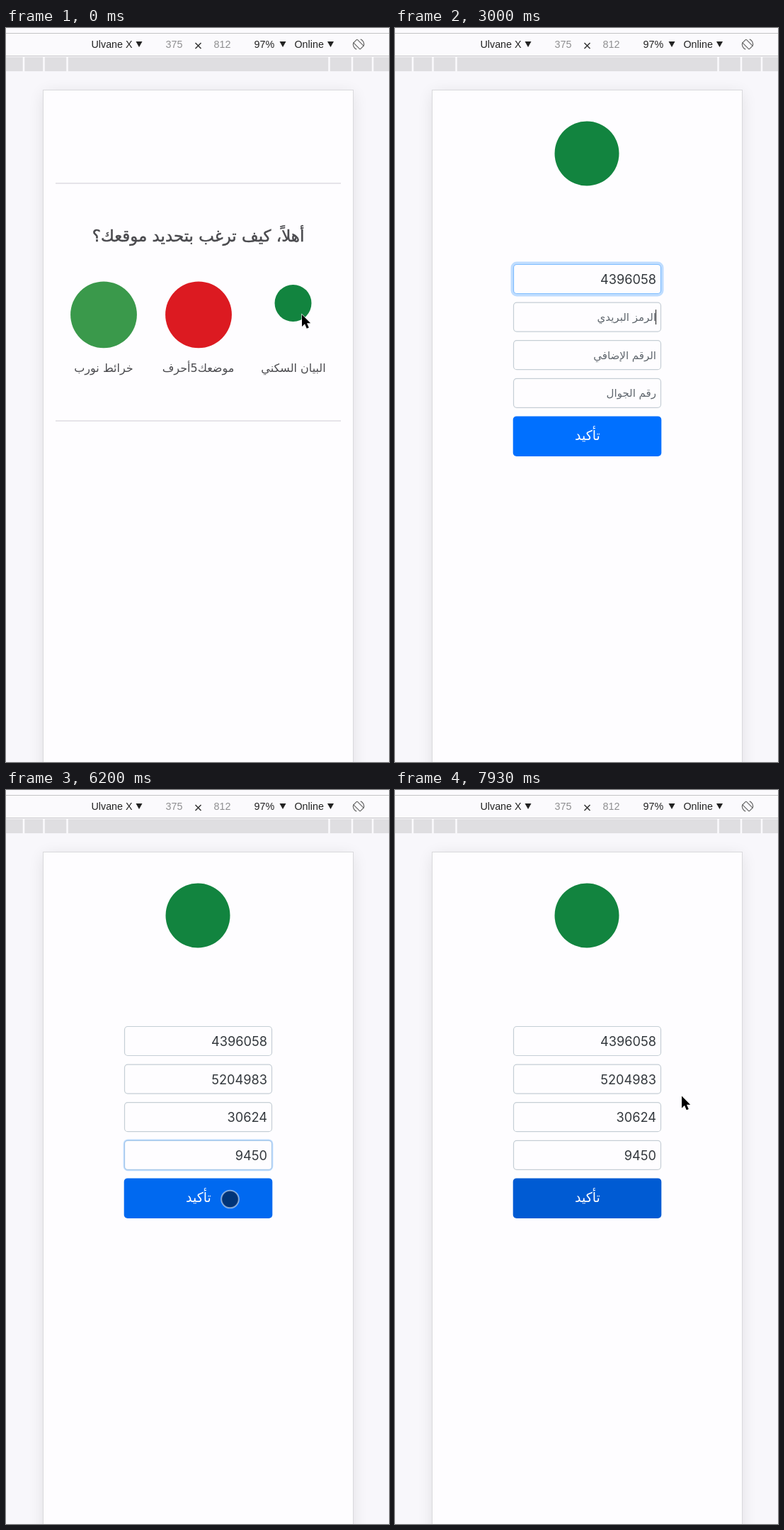
Recreate the animation shown at these times as an HTML page. Size 541 by 1035 pixels, loop 8 s.

```html
<!DOCTYPE html>
<html lang="ar">
<head>
<meta charset="utf-8">
<title>Address form</title>
<style>
html, body { margin: 0; width: 100%; height: 100%; overflow: hidden; background: #f8f7fb }
svg { display: block; width: 541px; height: 1035px; font-family: "DejaVu Sans", sans-serif }
.bar { font: 14.3px "Liberation Sans", Arial, sans-serif; fill: #222 }
.num { font: 18.2px Inter, sans-serif; fill: #33383d }
.hint { font-size: 15px; fill: #60676e }
.label { font-size: 16px; fill: #4a4a4e; text-anchor: middle }
.title { font-size: 22.9px; fill: #4a4a4e; stroke: #4a4a4e; stroke-width: .5 }
.end { text-anchor: end }
.mid { text-anchor: middle }
</style>
</head>
<body>
<svg viewBox="0 0 541 1035">
  <defs>
    <filter id="soft" x="-20%" y="-20%" width="140%" height="140%"><feGaussianBlur stdDeviation="11"/></filter>
  </defs>
  <rect width="541" height="1035" fill="#f8f7fb"/>
  <rect x="53" y="92" width="437" height="1000" fill="#000" opacity=".1" filter="url(#soft)"/>
  <rect width="541" height="41" fill="#fbfafd"/>
  <path d="M0 7.5H541M0 39.5H541" stroke="#c4c4c6"/>
  <rect y="41" width="541" height="20" fill="#dfdee1"/>
  <path d="M25 41v20M53.5 41v20M86.5 41v20M456.5 41v20M489 41v20M518 41v20" stroke="#fbfafd" stroke-width="2.5"/>
  <g class="bar">
    <text x="120.5" y="28">Ulvane X</text>
    <text x="225.5" y="28" fill="#8f8f91">375</text>
    <text x="293.5" y="28" fill="#8f8f91">812</text>
    <text x="350.5" y="28">97%</text>
    <text x="407.5" y="28">Online</text>
    <path d="M183.5 19h9l-4.5 8zM386.5 19h9l-4.5 8zM454 19h9l-4.5 8z"/>
  </g>
  <path d="M267.5 21l8 8m0-8l-8 8" stroke="#333" stroke-width="1.5"/>
  <g transform="translate(498 23) rotate(-45)" fill="none" stroke="#666" stroke-width="1.2">
    <rect x="-3.5" y="-6.5" width="7" height="13" rx="1"/>
    <path d="M-7 3A7.5 7.5 0 0 1-3-7M7-3A7.5 7.5 0 0 1 3 7"/>
  </g>
  <rect x="52.5" y="87.5" width="438" height="960" fill="#fefdff" stroke="#d9d9dc"/>

  <g id="menu">
    <path d="M70 219H473M70 554H473" stroke="#dedde2" stroke-width="1.4"/>
    <text class="title mid" x="271.5" y="300.5">أهلاً، كيف ترغب بتحديد موقعك؟</text>
    <circle cx="138" cy="404.3" r="46.9" fill="#3a994b"/>
    <circle cx="272" cy="404.3" r="46.9" fill="#dc1a21"/>
    <circle cx="405.5" cy="388" r="26" fill="#12843f"/>
    <text class="label" x="138" y="485">خرائط نورب</text>
    <text class="label" x="271.5" y="485">موضعك5أحرف</text>
    <text class="label" x="406" y="485">البيان السكني</text>
  </g>

  <g id="form">
    <circle cx="271" cy="177" r="45.5" fill="#12843f"/>
    <g id="fields"></g>
    <rect id="glow" x="166.7" y="547.4" width="209.6" height="56.6" rx="5" fill="none" stroke="#007bff"/>
    <rect id="button" x="166.7" y="547.4" width="209.6" height="56.6" rx="5"/>
    <text class="mid" x="272" y="581" font-size="19" fill="#fff">تأكيد</text>
  </g>

  <g id="alert">
    <rect x="2" y="8" width="540" height="156" rx="4" opacity=".35" filter="url(#soft)"/>
    <rect x="2" y="4" width="560" height="156" rx="3" fill="#fefdff" stroke="#b9b9bc"/>
    <text x="21.5" y="42" style="font:18.3px Inter,sans-serif" fill="#252528">localhost:8080 says</text>
    <text class="end" x="522" y="77" font-size="14.5" fill="#55555a">يرجى التأكد من العنوان المدخل</text>
    <rect x="445" y="102.5" width="77" height="38" rx="4" fill="#3b78e7"/>
    <text class="mid" x="483" y="126.5" style="font:500 14.5px Roboto,sans-serif" fill="#fff">OK</text>
  </g>

  <circle id="dot" r="12.3" fill="#000" fill-opacity=".5" stroke="#fff" stroke-opacity=".5" stroke-width="2"/>
  <path id="arrow" d="M0 0V17L4 13.3 6.8 19.8 9.8 18.5 7 12.2H12.2Z" stroke="#fff" stroke-width="1.2" paint-order="stroke"/>
</svg>
<script>
const LOOP = 8000, FADE = 150;
const $ = id => document.getElementById(id);
const clamp = v => Math.max(0, Math.min(1, v));
const ramp = (t, from, ms = FADE) => clamp((t - from) / ms);
const pulse = (t, from, to) => ramp(t, from) * (1 - ramp(t, to));
const show = (el, on) => el.setAttribute('display', on ? 'inline' : 'none');
const mix = (a, b, k) => `rgb(${a.map((v, i) => Math.round(v + (b[i] - v) * k))})`;

// hint, digits, focus and blur times, first and last keystroke
const fields = [
  ['رقم المبنى', '4396058', 1980, 3000, 2470, 2800],
  ['الرمز البريدي', '5204983', 3000, 3870, 3250, 3700],
  ['الرقم الإضافي', '30624', 3870, 4655, 4130, 4540],
  ['رقم الجوال', '9450', 4655, 6120, 5000, 5470]
].map(([hint, digits, focus, blur, first, last], i) => {
  const y = 333.5 + i * 53.6;
  const box = `x="167.5" y="${y}" width="208" height="41" rx="4.5"`;
  const g = document.createElementNS('http://www.w3.org/2000/svg', 'g');
  g.innerHTML = `<rect ${box} fill="none" stroke="#007bff" stroke-opacity=".25"/>
    <rect ${box} fill="#fefdff" stroke-width="1.2"/>
    <text class="hint end" x="369" y="${y + 26}">${hint}</text>
    <text class="num end" x="369" y="${y + 27.5}"></text>
    <path d="M0 ${y + 10}v21" stroke="#333" stroke-width="1.2"/>`;
  $('fields').append(g);
  const [ring, frame, hintEl, num, caret] = g.children;
  return t => {
    const p = pulse(t, focus, blur);
    const count = t < first ? 0 : 1 + Math.floor(ramp(t, first, last - first) * (digits.length - 1));
    ring.setAttribute('stroke-width', 8 * p);
    frame.setAttribute('stroke', mix([197, 206, 213], [128, 189, 255], p));
    num.textContent = digits.slice(0, count);
    show(hintEl, !count);
    show(caret, t >= focus && t < blur && (t - (t > last ? last : focus)) % 1000 < 500);
    const x = 368.5 - (count && num.getComputedTextLength());
    caret.setAttribute('transform', `translate(${x})`);
  };
});

// time, x, y of the pointer
const path = [
  [0, 418, 404], [400, 412, 398], [1100, 412, 398], [1750, 323, 366], [1900, 323, 363],
  [5650, 323, 363], [6050, 316.5, 577], [6470, 316.5, 577], [6850, 298, 623],
  [7030, 298, 623], [7300, 482, 122], [7470, 482, 122], [7900, 405, 431.5], [LOOP, 405, 431.5]
];

function pointer(t) {
  const i = path.findIndex(k => k[0] > t);
  const [t0, x0, y0] = path[i - 1], [t1, x1, y1] = path[i];
  const k = ramp(t, t0, t1 - t0), e = k * k * (3 - 2 * k);
  return `translate(${x0 + (x1 - x0) * e} ${y0 + (y1 - y0) * e})`;
}

function draw(t) {
  show($('menu'), t < 1000);
  show($('form'), t >= 1000);
  show($('alert'), t >= 6600 && t < 7450);
  fields.forEach(f => f(t));

  const glow = pulse(t, 6210, 7450);
  $('glow').setAttribute('stroke-width', 8 * glow);
  $('glow').setAttribute('stroke-opacity', .5 * glow);
  $('button').setAttribute('fill', mix([0, 112, 255], [0, 91, 211], ramp(t, 6150)));

  const at = pointer(t);
  $('dot').setAttribute('transform', at);
  $('arrow').setAttribute('transform', at);
  show($('dot'), t >= 300 && t < 2250 || t >= 5650 && t < 6500);
  show($('arrow'), t < 300 || t >= 6500);
}

const start = performance.now();
function tick(now) {
  draw(Math.max(0, now - start) % LOOP);
  requestAnimationFrame(tick);
}
draw(0);
requestAnimationFrame(tick);
</script>
</body>
</html>
```
